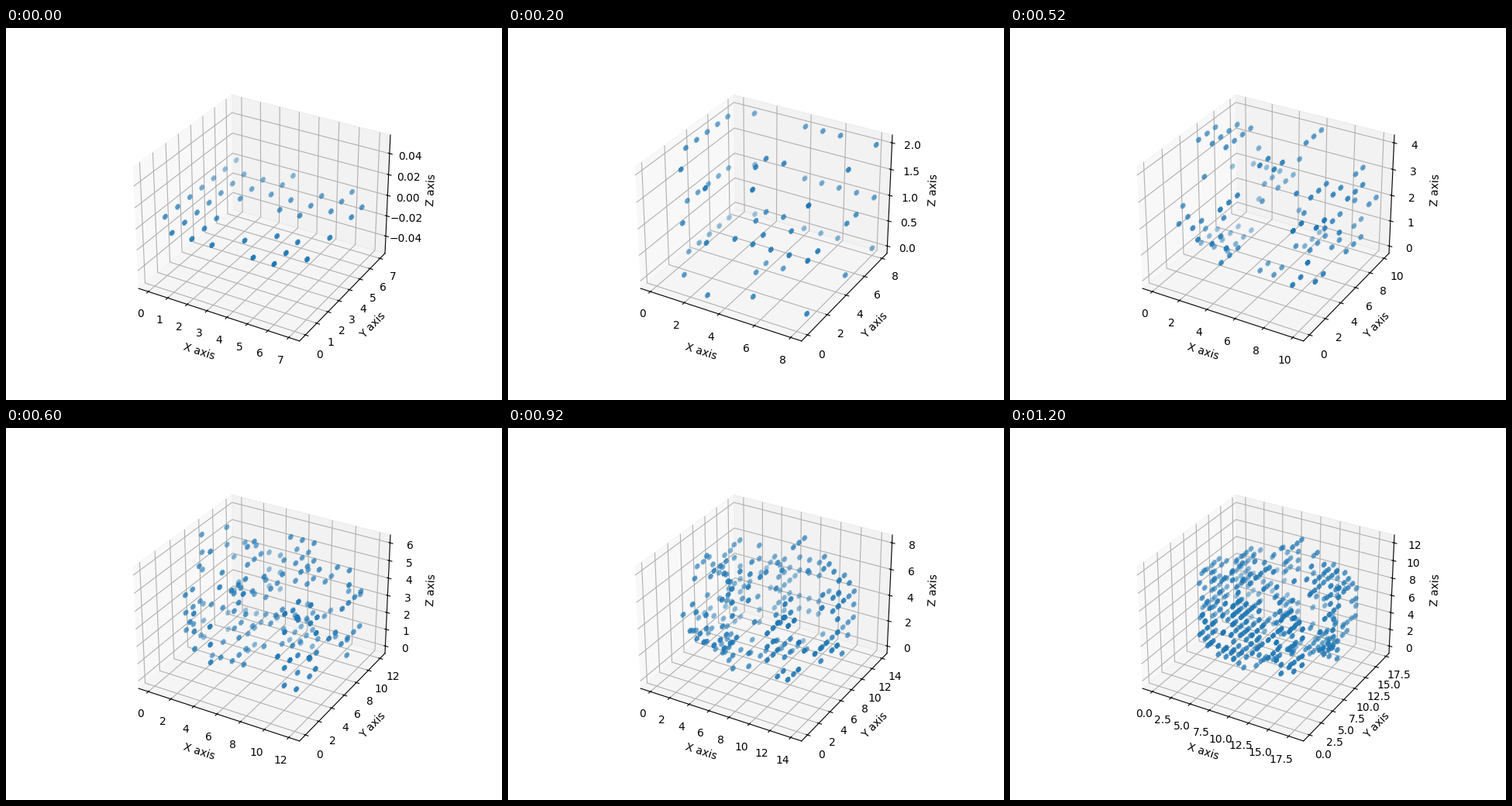
A matplotlib script that plays this animation: 640 by 480 pixels, repeating every 1.4 s.

```python
import matplotlib.pyplot as plt
import numpy as np
from matplotlib.animation import FuncAnimation

CYCLES = 6
# Starting slice: one string per y, from y = 0 upwards.
SEED = [
    ".###.##.",
    "###.#.##",
    "###..##.",
    "##.....#",
    "###.##..",
    "########",
    "####.###",
    "#..#..#.",
]


def step(cells):
    """Grow the grid by one on every side and apply the 3D life rule."""
    cells = np.pad(cells, 1)
    padded = np.pad(cells, 1).astype(int)
    nx, ny, nz = cells.shape
    total = sum(
        padded[i:i + nx, j:j + ny, k:k + nz]
        for i, j, k in np.ndindex(3, 3, 3)
    )
    # The total counts the cell itself.
    return (total == 3) | (cells & (total == 4))


rows = np.array([[c == "#" for c in row] for row in SEED])
generations = [rows.T[:, :, np.newaxis]]
for _ in range(CYCLES):
    generations.append(step(generations[-1]))

fig = plt.figure(figsize=(6.4, 4.8), dpi=100)
ax = fig.add_subplot(projection="3d")


def draw(frame):
    ax.clear()
    ax.scatter(*np.nonzero(generations[frame]), marker=r"$\#$")
    ax.set_xlabel("X axis")
    ax.set_ylabel("Y axis")
    ax.set_zlabel("Z axis")


anim = FuncAnimation(fig, draw, frames=len(generations), init_func=lambda: None,
                     interval=200, repeat=True, repeat_delay=0)
plt.show()
```
